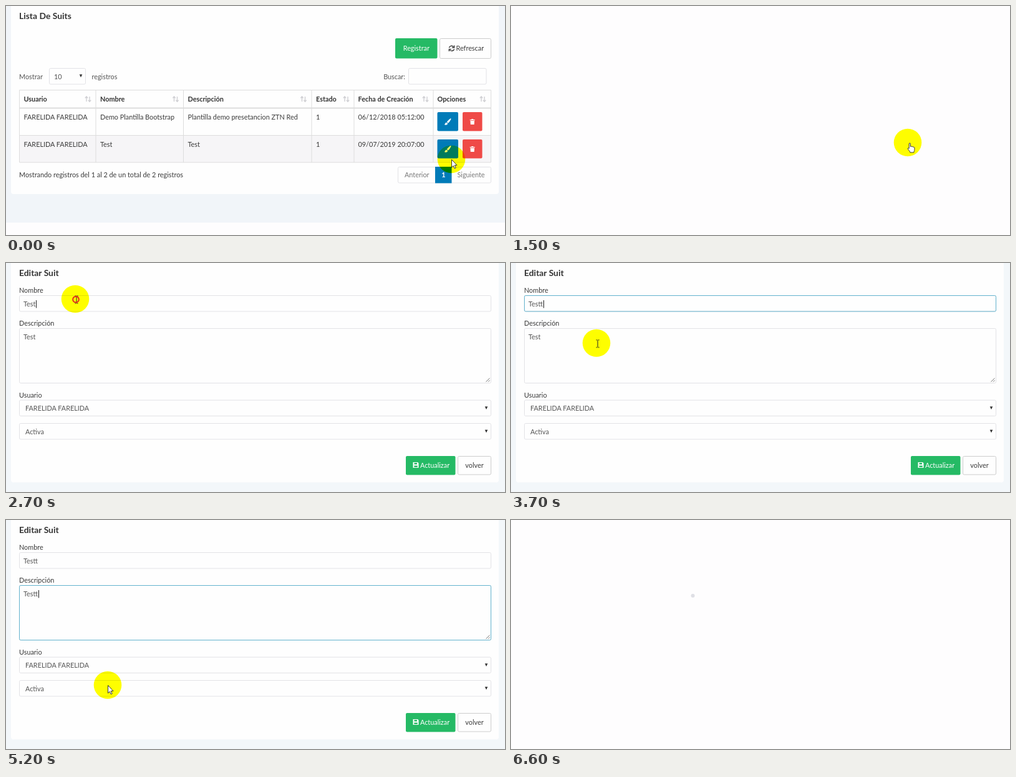
Animation, 800 px wide and 369 px high, one loop 6700 ms. Source, as an HTML page:

```html
<!DOCTYPE html>
<html lang="es">
<head>
<meta charset="utf-8">
<title>Lista De Suits</title>
<style>
  html, body { margin: 0; width: 100%; height: 100%; overflow: hidden; background: #fefdfe; }
  svg { display: block; width: 800px; height: 369px; }
  text { font: 10.85px Lato, "Open Sans", sans-serif; fill: #555; }
  .dark { fill: #3a3a3a; }
  .soft { fill: #777; }
  .white { fill: #fff; }
  .bold { font-weight: 700; fill: #333; }
  .title { font-size: 13.9px; }
  .mid { text-anchor: middle; }
  .page { fill: #f1f5f9; }
  .card { fill: #fefefe; }
  .box { fill: #fefefe; stroke: #e2e2e6; }
  .outline { fill: #fefefe; stroke: #ccc; }
  .grid { fill: none; stroke: #ddd; }
  .blue { fill: #007bb8; }
  .red { fill: #ef4a47; }
  .green { fill: #25ba65; }
  .focus { fill: none; stroke: #62b2cd; }
  .caret { stroke: #222; }
  #glow { fill: #ff0; mix-blend-mode: multiply; }
  #tint { fill: #00005c; mix-blend-mode: lighten; }
</style>
</head>
<body>
<svg viewBox="0 0 800 369">
  <defs>
    <path id="sort" d="M-2.5 4V-4M-4.7 -1.6L-2.5 -4.2L-.3 -1.6M2.5 -4V4M.3 1.6L2.5 4.2L4.7 1.6" fill="none" stroke="#cfcfd3" stroke-width="1.4"/>
    <path id="brush" d="M5 -5.5C2.5 -4 .3 -1.8 -1.2 .5L.8 2.3C3 .3 4.8 -2.4 5.6 -4.8ZM-1.9 1.2C-4 1.2 -3.6 3.8 -5.4 4.6C-3 5.8 .2 5.2 .1 2.8Z" fill="#fff"/>
    <path id="trash" d="M-4 -3.4H-1.5V-4.6H1.5V-3.4H4V-2.2H-4ZM-3.3 -1.4H3.3L2.9 4.6H-2.9Z" fill="#fff"/>
    <path id="down" d="M-2.3 -2.2H2.3L0 2.4Z" fill="#333"/>
    <g id="edit"><rect class="blue" x="691.5" y="171" width="33.5" height="30.5" rx="2"/><use href="#brush" x="708" y="186.5"/></g>
    <g id="remove"><rect class="red" x="732" y="171" width="31.5" height="30.5" rx="2"/><use href="#trash" x="747.7" y="186.5"/></g>
    <clipPath id="buttons">
      <rect x="691.5" y="215" width="33.5" height="30.5"/>
      <rect x="641" y="311" width="79.5" height="30.5"/>
    </clipPath>
  </defs>

  <g id="list">
    <rect class="page" width="800" height="349"/>
    <rect class="card" x="8" y="-10" width="782" height="313" rx="4"/>
    <text class="bold title" x="21" y="21">Lista De Suits</text>

    <rect class="green" x="624" y="52" width="67.5" height="32.5" rx="2"/>
    <text class="white mid" x="657.8" y="72">Registrar</text>
    <rect class="outline" x="695.5" y="52.5" width="82" height="32" rx="2"/>
    <g fill="none" stroke="#333" stroke-width="1.4">
      <path d="M710.4 67.3A4 4 0 0 1 717.4 65.7M718.6 69.3A4 4 0 0 1 711.6 70.9"/>
      <path d="M718.6 63.6V67H715.2M710.4 73V69.6H713.8"/>
    </g>
    <text class="dark" x="721.5" y="72">Refrescar</text>

    <text x="21" y="118">Mostrar</text>
    <rect class="box" x="69.5" y="100.5" width="58" height="25.5" rx="2"/>
    <text x="77" y="118">10</text>
    <use href="#down" x="120" y="112.5"/>
    <text x="137.5" y="118">registros</text>
    <text x="640" y="118" text-anchor="end">Buscar:</text>
    <rect class="box" x="645.5" y="100.5" width="124.5" height="25.5" rx="2"/>

    <rect x="21" y="208" width="756" height="44" fill="#f6f5f7"/>
    <path class="grid" d="M21.5 135.5H777.5V252H21.5ZM144 135V252M284.5 135V252M490 135V252M558 135V252M685 135V252M21 208.5H777"/>
    <path class="grid" d="M21 164.5H777" stroke-width="1.8"/>
    <text class="bold" x="28.5" y="154">Usuario</text>
    <text class="bold" x="151" y="154">Nombre</text>
    <text class="bold" x="291.5" y="154">Descripción</text>
    <text class="bold" x="497" y="154">Estado</text>
    <text class="bold" x="564.5" y="154">Fecha de Creación</text>
    <text class="bold" x="691.5" y="154">Opciones</text>
    <use href="#sort" x="131.5" y="150"/><use href="#sort" x="272" y="150"/>
    <use href="#sort" x="477" y="150"/><use href="#sort" x="545.5" y="150"/>
    <use href="#sort" x="672.5" y="150"/><use href="#sort" x="764.5" y="150"/>

    <text class="dark" x="28.5" y="183">FARELIDA FARELIDA</text>
    <text class="dark" x="151" y="183">Demo Plantilla Bootstrap</text>
    <text class="dark" x="291.5" y="183">Plantilla demo presetancion ZTN Red</text>
    <text class="dark" x="497" y="183">1</text>
    <text class="dark" x="564.5" y="183">06/12/2018 05:12:00</text>
    <text class="dark" x="28.5" y="227">FARELIDA FARELIDA</text>
    <text class="dark" x="151" y="227">Test</text>
    <text class="dark" x="291.5" y="227">Test</text>
    <text class="dark" x="497" y="227">1</text>
    <text class="dark" x="564.5" y="227">09/07/2019 20:07:00</text>
    <use href="#edit"/><use href="#remove"/>
    <use href="#edit" y="44"/><use href="#remove" y="44"/>
    <g id="editHover">
      <rect x="691.5" y="215" width="33.5" height="30.5" rx="2" fill="#005a80"/>
      <use href="#brush" x="708" y="230.5"/>
    </g>

    <text class="dark" x="21" y="275.5">Mostrando registros del 1 al 2 de un total de 2 registros</text>
    <rect class="box" x="628.5" y="259.5" width="149" height="25.5" rx="2"/>
    <rect class="blue" x="688" y="259" width="26.5" height="26.5"/>
    <text class="soft" x="639" y="276">Anterior</text>
    <text class="white mid" x="701.3" y="276" style="font-weight: 700">1</text>
    <text class="soft" x="723.5" y="276">Siguiente</text>
    <rect id="status" class="outline" x="-4" y="357.5" width="123" height="20" rx="2"/>
  </g>

  <g id="form">
    <rect width="800" height="369" fill="#f3f7fa"/>
    <rect class="card" x="8" y="-10" width="782" height="363.5" rx="4"/>
    <text class="bold title" x="21" y="21">Editar Suit</text>

    <text class="dark" x="21" y="48">Nombre</text>
    <rect class="box" x="21.5" y="52.5" width="756" height="25.5" rx="2"/>
    <rect id="nameFocus" class="focus" x="21.5" y="52.5" width="756" height="25.5" rx="2"/>
    <text id="name1" x="28" y="70">Test</text>
    <text id="name2" x="28" y="70">Testt</text>
    <path id="caret1" class="caret" d="M48.5 60V72.5"/>
    <path id="caret2" class="caret" d="M52.5 60V72.5"/>

    <text class="dark" x="21" y="101">Descripción</text>
    <rect class="box" x="21.5" y="105.5" width="756" height="88" rx="2"/>
    <rect id="areaFocus" class="focus" x="21.5" y="105.5" width="756" height="88" rx="2"/>
    <path d="M769.5 191.5L775.5 185.5M773 191.5L775.5 189" stroke="#777"/>
    <text id="area1" x="28" y="123">Test</text>
    <text id="area2" x="28" y="123">Testt</text>
    <path id="caret3" class="caret" d="M48.5 113V125.5"/>
    <path id="caret4" class="caret" d="M52.5 113V125.5"/>
    <path id="spell" d="M28 125.4l1.5 -1l1.5 1l1.5 -1l1.5 1l1.5 -1l1.5 1l1.5 -1l1.5 1l1.5 -1l1.5 1l1.5 -1l1.5 1l1.5 -1l1.5 1l1.5 -1l1.5 1" fill="none" stroke="#e33"/>

    <text class="dark" x="21" y="217">Usuario</text>
    <rect class="box" x="21.5" y="221" width="756" height="25.5" rx="2"/>
    <text x="31" y="238">FARELIDA FARELIDA</text>
    <use href="#down" x="770" y="233.5"/>
    <rect class="box" x="21.5" y="258.5" width="756" height="25.5" rx="2"/>
    <text x="31" y="276">Activa</text>
    <use href="#down" x="770" y="271"/>

    <rect class="green" x="641" y="311" width="79.5" height="30.5" rx="2"/>
    <rect id="saveHover" x="641" y="311" width="79.5" height="30.5" rx="2" fill="#009a4b"/>
    <path d="M652.5 321H660L661.5 322.5V330H652.5ZM654.5 322V324.5H659V322ZM654.3 326.5V329H659.7V326.5Z" fill="#fff" fill-rule="evenodd"/>
    <text class="white" x="664" y="330">Actualizar</text>
    <rect class="outline" x="724.5" y="311.5" width="53" height="29.5" rx="2"/>
    <text class="dark mid" x="751" y="330">volver</text>
  </g>

  <circle id="dot" cx="291.5" cy="122" r="3" fill="#dfdfe5"/>

  <circle id="glow" class="follow" r="22.3"/>
  <g id="tint" clip-path="url(#buttons)"><circle class="follow" r="22.3"/></g>
  <g id="pointer" class="follow">
    <path id="arrow" d="M.5 .5V13L3.3 10.4L5.2 14.8L7.2 13.9L5.3 9.6H9Z" fill="#fff" stroke="#222" stroke-width=".9"/>
    <path id="hand" d="M2.2 2C2.2 .6 4.4 .6 4.4 2V6.5C5 5.7 6.6 6 6.7 6.9C7.4 6.2 8.9 6.6 8.9 7.5C9.7 7 10.9 7.4 10.9 8.5V11.5C10.9 13 10 14 9.8 16H3.9C3.6 14 1.5 12.4 .3 10.2C-.3 8.9 1 8.3 2.2 9.6Z" fill="#fff" stroke="#222" stroke-width=".9"/>
    <path id="beam" d="M-.5 -5H1.5M2.5 -5H4.5M2 -4.5V6.5M-.5 7H1.5M2.5 7H4.5" fill="none" stroke="#222"/>
    <circle id="ring" cx="1" cy=".7" r="4.8" fill="none" stroke="#e5261f" stroke-width="2"/>
  </g>
</svg>
<script>
  const LOOP = 6700, TICK = 100;

  function run(selector, frames) {
    for (const el of document.querySelectorAll(selector))
      el.animate(frames, { duration: LOOP, iterations: Infinity });
  }

  // Visible only within the given [start, end) spans, in ms.
  function show(selector, ...spans) {
    // A map keeps one state per time, so a span may start at 0.
    const states = new Map([[0, 0]]);
    for (const [start, end] of spans) states.set(start, 1).set(end, 0);
    states.set(LOOP, 0);
    run(selector, [...states].map(([t, opacity]) => ({ offset: t / LOOP, opacity, easing: 'steps(1)' })));
  }

  // Moves in whole ticks along [time, x, y] points.
  function move(selector, points) {
    run(selector, points.map(([t, x, y], i) => {
      const end = i + 1 < points.length ? points[i + 1][0] : t + TICK;
      return {
        offset: t / LOOP,
        transform: `translate(${x}px, ${y}px)`,
        easing: `steps(${Math.round((end - t) / TICK)})`
      };
    }));
  }

  show('#list', [0, 1500]);
  show('#form', [1700, 6200]);
  show('#dot', [6500, LOOP]);
  show('#status', [1000, 1500]);
  show('#editHover', [1000, 1500]);
  show('#saveHover', [5600, 6200]);

  show('#nameFocus', [2800, 4000]);
  show('#areaFocus', [4000, 6200]);
  show('#name1', [1700, 3000]);
  show('#name2', [3000, 6200]);
  show('#area1', [1700, 4600]);
  show('#area2', [4600, 6200]);
  show('#caret1', [2700, 3000]);
  show('#caret2', [3000, 4000]);
  show('#caret3', [4000, 4600]);
  show('#caret4', [4600, 6200]);
  show('#spell', [5300, 6200]);

  show('#arrow', [0, 1000], [1600, 2400], [5000, 5600]);
  show('#hand', [1000, 1600], [5600, 6200]);
  show('#beam', [2400, 5000]);
  show('#ring', [1300, 1400], [2700, 2900], [4000, 4200], [5900, 6100]);
  show('#glow, #tint', [0, 6200]);

  move('.follow', [
    [0, 714, 247], [300, 728, 263], [800, 728, 263], [1100, 709, 236], [1400, 709, 236],
    [1700, 490, 188], [1900, 447, 136], [2000, 447, 136], [2600, 111, 58], [3300, 111, 58],
    [3600, 147, 130], [4000, 107, 126], [4700, 107, 126], [5200, 163, 266],
    [5400, 430, 308], [5600, 693, 331], [LOOP, 693, 331]
  ]);
</script>
</body>
</html>
```
